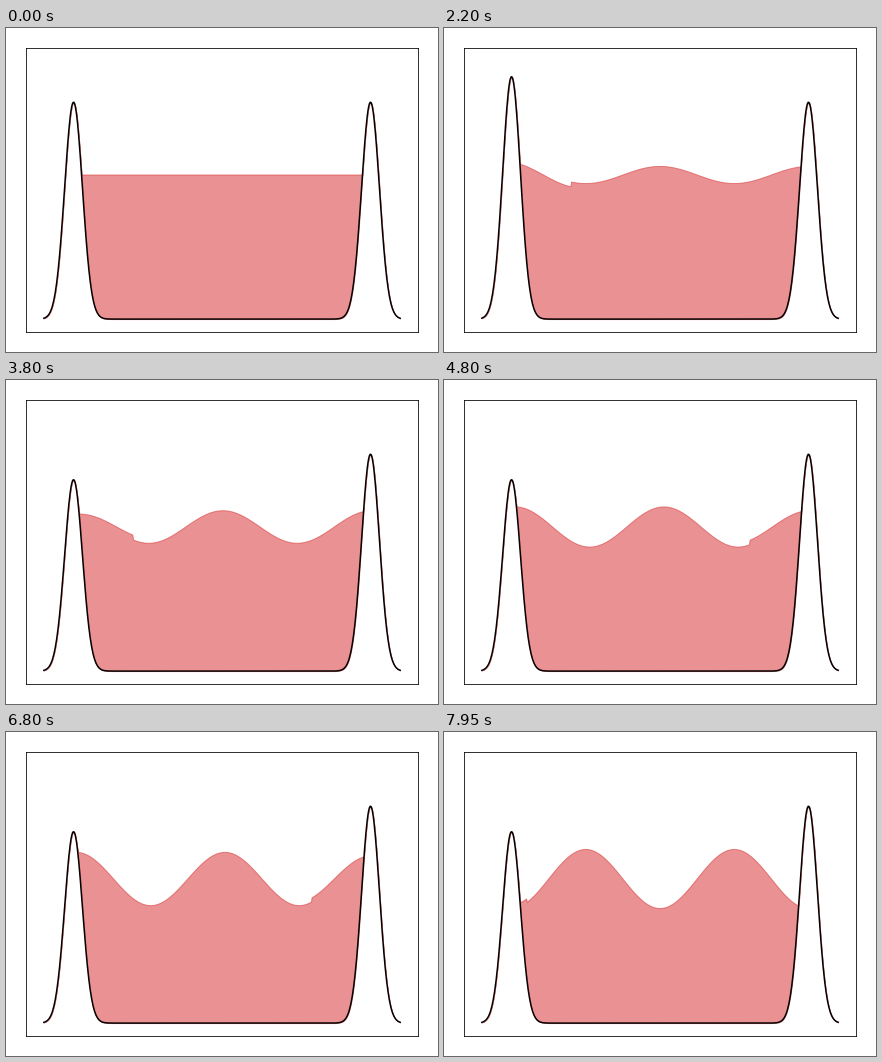
Recreate the animation shown at these times as a matplotlib script. Size 432x324 px, loop 8 s.

```python
import numpy as np
import matplotlib.pyplot as plt
from matplotlib.animation import FuncAnimation

W, H, DPI, PAD = 432, 324, 72, 20
FRAMES, INTERVAL = 160, 50

PERIOD = 10        # frames per swing of the left wall
SPEED = 0.05       # cavity lengths per frame
WAVENUM = 4 * np.pi
SWING = 0.2        # height change of the left wall
SIGMA = 0.03
LEVEL = 2 / 3
GAIN = 0.025       # amplitude of the emitted wave
REFLECT = 0.95     # kept at each reflection

x = np.linspace(-0.1, 1.1, 500)
inside = (x >= 0) & (x <= 1)


def bump(center):
    return np.exp(-((x - center) / SIGMA) ** 2 / 2)


def walls(n):
    left = 1 + SWING * np.sin(2 * np.pi * n / PERIOD)
    return left * bump(0) + bump(1)


def surface(n):
    """Level plus every pass of the wave that has already arrived."""
    front = n * SPEED
    u = np.zeros_like(x)
    for k in range(int(front) + 1):
        dist = k + (x if k % 2 == 0 else 1 - x)
        wave = -np.cos(2 * np.pi * n / PERIOD - WAVENUM * dist)
        u += np.where(dist < front, GAIN * REFLECT ** k * wave, 0)
    return np.where(inside, LEVEL + u, 0)


def outline(n):
    low = walls(n)
    high = np.maximum(low, surface(n))
    return np.column_stack([np.r_[x, x[::-1]], np.r_[low, high[::-1]]])


fig = plt.figure(figsize=(W / DPI, H / DPI), dpi=DPI, facecolor="white")
ax = fig.add_axes([PAD / W, PAD / H, 1 - 2 * PAD / W, 1 - 2 * PAD / H])
ax.set_xticks([])
ax.set_yticks([])
top = 1 + SWING * np.sin(np.radians(72))
ax.set_xlim(-0.16, 1.16)
ax.set_ylim(-0.05 * top, 1.05 * top)

fill = ax.fill_between(x, walls(0), walls(0), color="tab:red", alpha=0.5, lw=1)
line, = ax.plot(x, walls(0), color="black", lw=1.5)


def draw(n):
    fill.set_verts([outline(n)])
    line.set_ydata(walls(n))
    return fill, line


anim = FuncAnimation(fig, draw, frames=FRAMES, interval=INTERVAL,
                     init_func=lambda: draw(0), repeat=True, repeat_delay=0)
plt.show()
```
